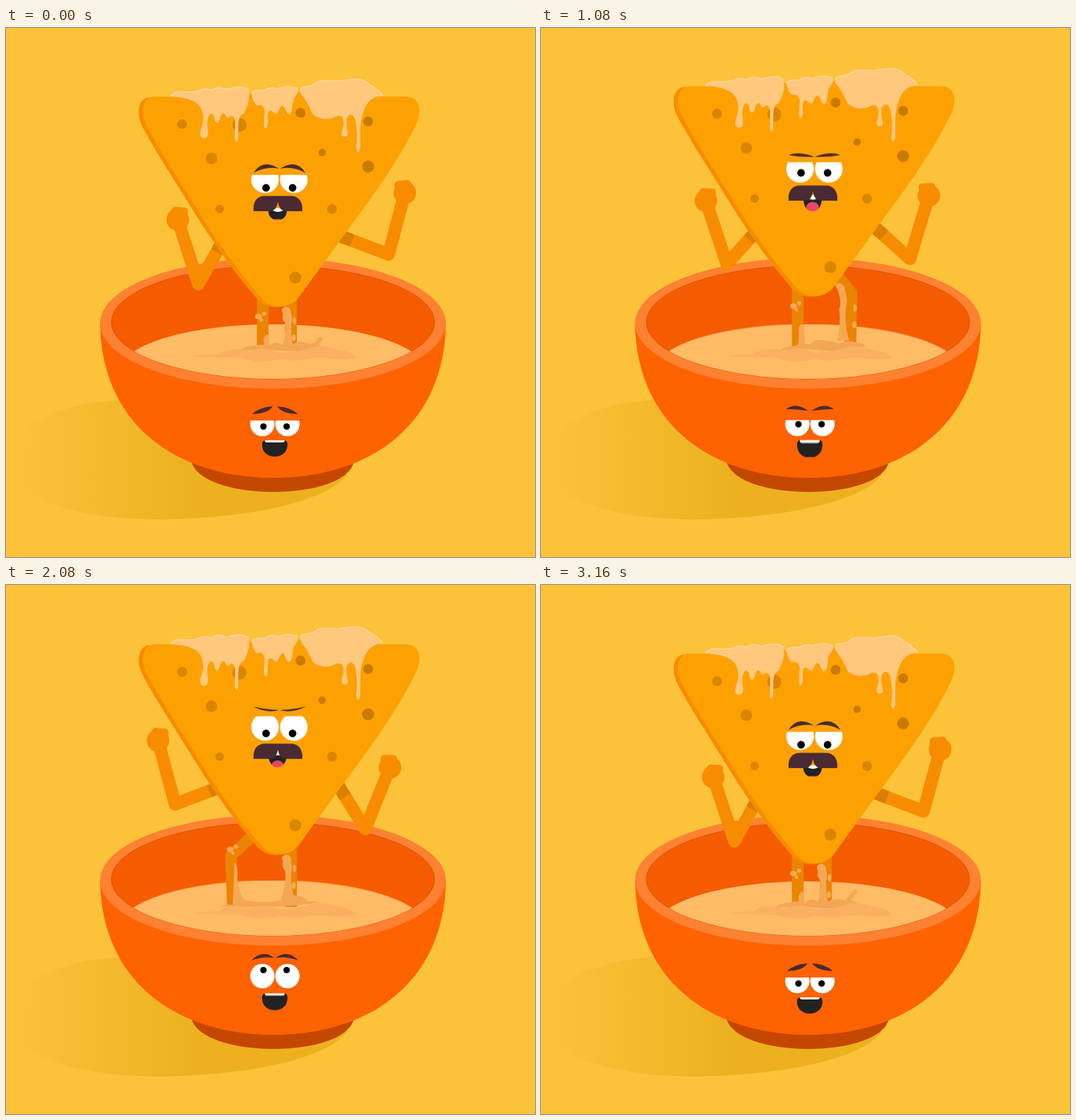
These frames come from a looping animation (748 by 748 pixels, 3200 ms). An HTML page:

```html
<!DOCTYPE html>
<html lang="en">
<head>
<meta charset="utf-8">
<title>Chip in a dip</title>
<style>
html, body { margin: 0; height: 100%; overflow: hidden; background: #fcc23a; }
svg { display: block; width: 100vw; height: 100vh; }

[class] {
  animation: 3200ms cubic-bezier(.37, 0, .63, 1) infinite;
}
.arm, .leg, .streak, .bits, .splash, .level { animation-duration: 1600ms; }
.arm, .leg { fill: none; stroke-linejoin: round; }
.arm { stroke: #f88c00; stroke-width: 18; }
.root { stroke: #da7f00; stroke-dasharray: 24 999; }
.leg { stroke: #eb8400; stroke-width: 16.5; }
.streak, .bits { fill: #f5a854; }

/* Body and liquid */
.bob { animation-name: bob; }
@keyframes bob {
  0%, 99.4%, 100% { transform: translateY(0); }
  10.3% { transform: translateY(-25px); }
  25% { transform: translateY(4px); }
  34.4% { transform: translateY(-15px); }
  46.25% { transform: translateY(2px); }
  60.3% { transform: translateY(-18px); }
  74.7% { transform: translateY(2px); }
  86.9% { transform: translateY(-21px); }
}
.level { animation-name: level; }
@keyframes level {
  0%, 52%, 100% { transform: translateY(0); }
  30% { transform: translateY(-1.5px); }
  80% { transform: translateY(-.7px); }
}
.shade { animation-name: shade; }
@keyframes shade {
  0%, 15%, 65%, 100% { transform: translateX(0); }
  26.25% { transform: translateX(3px); }
  42.5% { transform: translateX(-6px); }
  80% { transform: translateX(8px); }
}
.splash { animation-name: splash; }
@keyframes splash {
  0%, 48%, 52.5%, 100% { d: path("M330 456Q340 449 352 449Q362 446 372 450Q380 442 389 447Q397 450 405 447Q418 441 430 447Q440 444 446 450Q420 460 388 456Q360 454 330 456Z"); }
  22%, 33% { d: path("M304 454Q312 450 322 453Q334 444 345 447Q370 450 388 446Q400 436 415 440Q424 442 426 448Q438 446 443 449Q400 456 360 454Q330 457 304 454Z"); }
  72.5%, 86% { d: path("M338 457Q348 449 360 450Q370 444 382 447Q390 438 402 441Q412 441 424 446Q436 440 448 444Q458 444 461 450Q430 460 395 455Q360 452 338 457Z"); }
}
.jet { animation-name: jet; }
@keyframes jet {
  0% { transform: translateY(7px); }
  3%, 92% { transform: translateY(22px); }
  97%, 98.75% { transform: translateY(0); }
  100% { transform: translateY(7px); }
}

/* Limbs */
.arm.l { animation-name: arm-l; }
@keyframes arm-l {
  0%, 100% { d: path("M310 296L272 362L243 271"); animation-timing-function: ease-out; }
  30% { d: path("M310 296L239 323L215 233"); }
  44% { d: path("M310 296L238 325L214 235"); }
  85% { d: path("M310 296L278 363L245 274"); animation-timing-function: ease-in; }
}
.arm.r { animation-name: arm-r; }
@keyframes arm-r {
  0%, 100% { d: path("M467 292L541 320L564 233"); }
  30% { d: path("M467 292L508 358L543 271"); animation-timing-function: ease-out; }
  48% { d: path("M467 292L501 364L532 273"); }
  85% { d: path("M467 292L539 322L562 234"); }
  94% { d: path("M467 292L541 320L565 232"); }
}
.leg.l { animation-name: leg-l; }
@keyframes leg-l {
  0%, 2.5%, 48%, 100% { d: path("M363 340L363 396L363 500"); }
  22.5%, 33% { d: path("M362 356L318 396L322 500"); }
}
.leg.r { animation-name: leg-r; }
@keyframes leg-r {
  0%, 52.5%, 97.5%, 100% { d: path("M403 350L403 396L403 500"); }
  72.5%, 85% { d: path("M412 355L445 389L442 500"); }
}
.streak.l { animation-name: streak-l; }
@keyframes streak-l {
  0%, 2.5%, 48%, 100% { d: path("M364 440Q368 430 372 436Q372 446 374 470L362 470Q366 450 364 440Z"); }
  22.5%, 33% { d: path("M323 405Q329 412 327 430Q330 455 350 476L320 476Q322 440 323 405Z"); }
}
.streak.r { animation-name: streak-r; }
@keyframes streak-r {
  0%, 52.5%, 97.5%, 100% { d: path("M390 400C391 393 400 392 403 400C403 408 406 412 403 420C404 432 402 442 411 462L388 462C394 440 398 425 394 416C388 410 394 406 390 400Z"); }
  72.5%, 85% { d: path("M420 374C426 370 434 374 434 380C435 390 440 396 436 406C434 420 435 440 440 456L424 456C427 440 428 425 426 412C432 404 426 384 420 374Z"); }
}
.bits.l { animation-name: bits-l; }
@keyframes bits-l {
  0%, 2.5%, 48%, 100% { transform: translate(0, 0); }
  22.5%, 33% { transform: translate(-40px, -21px); }
}
.bits.r { animation-name: bits-r; }
@keyframes bits-r {
  0%, 52.5%, 97.5%, 100% { transform: translate(0, 0); }
  72.5%, 85% { transform: translate(42px, -4px); }
}

/* Chip face */
.lid { animation-name: lid; }
@keyframes lid {
  0%, 42.5%, 98.75%, 100% { transform: translateY(0); }
  15%, 26.25% { transform: translateY(-5.7px); }
  65% { transform: translateY(-9px); }
  80% { transform: translateY(-10px); }
}
.look { animation-name: look; }
@keyframes look {
  0%, 42.5%, 98.75%, 100% { transform: translateY(0); }
  15% { transform: translateY(-10px); }
  26.25% { transform: translateY(-11.5px); }
  65% { transform: translateY(-3px); }
  80% { transform: translateY(-4px); }
}
.brow { animation-name: brow; }
@keyframes brow {
  0%, 42.5%, 98.75%, 100% { d: path("M350 205Q363 184 386 199Q368 195 350 205Z"); }
  15% { d: path("M349 188Q366 193 386 195Q370 200 349 188Z"); }
  26.25% { d: path("M350 186Q366 192 387 195Q371 200 350 186Z"); }
  65% { d: path("M349 185Q366 189 386 190Q370 195 349 185Z"); }
  80% { d: path("M349 183Q366 188 386 190Q370 196 349 183Z"); }
}
.mouth { transform-origin: 0 255px; animation-name: mouth; }
@keyframes mouth {
  0%, 42.5%, 98.75%, 100% { transform: none; }
  15%, 26.25% { transform: translateY(-8px) scaleY(1.75); }
  65% { transform: translateY(-8px) scaleY(1.45); }
  80% { transform: translateY(-6px) scaleY(1.27); }
}
.teeth { animation-name: teeth; }
@keyframes teeth {
  0%, 36%, 48%, 100% { transform: translateY(0); }
  42.5% { transform: translateY(9px); }
}
.tongue { animation-name: tongue; }
@keyframes tongue {
  0%, 98.75%, 100% { transform: translateY(0); }
  15%, 26.25% { transform: translateY(-.5px); }
  42.5% { transform: translateY(-17px); }
  65% { transform: translateY(-5px); }
  80% { transform: translateY(-3px); }
}

/* Bowl face */
.bowl-eyes { animation-name: bowl-eyes; }
@keyframes bowl-eyes {
  0%, 42.5%, 98.75%, 100% { transform: translateY(0); }
  65% { transform: translateY(-7px); }
  80% { transform: translateY(-6px); }
}
.bowl-lid { animation-name: bowl-lid; }
@keyframes bowl-lid {
  0%, 42.5%, 98.75%, 100% { transform: translateY(0); }
  15% { transform: translateY(-6px); }
  26.25% { transform: translateY(-1px); }
  65%, 80% { transform: translateY(-25px); }
}
.bowl-look { animation-name: bowl-look; }
@keyframes bowl-look {
  0%, 15%, 98.75%, 100% { transform: translateY(0); }
  26.25%, 42.5% { transform: translateY(-3.3px); }
  65% { transform: translateY(-19px); }
  80% { transform: translateY(-16.5px); }
}
.bowl-brow { animation-name: bowl-brow; }
@keyframes bowl-brow {
  0%, 98.75%, 100% { d: path("M348 546Q358 536 377 535Q371 545 348 546Z"); }
  15% { d: path("M347 541Q358 532 378 531Q370 540 347 541Z"); }
  26.25% { d: path("M347 541Q361 530 379 539Q363 540 347 541Z"); }
  42.5% { d: path("M346 536Q360 527 376 544Q360 538 346 536Z"); }
  65% { d: path("M347 531Q362 515 379 527Q362 525 347 531Z"); }
  80% { d: path("M347 534Q361 524 378 526Q368 533 347 534Z"); }
}
.bowl-mouth { transform-origin: 0 583px; animation-name: bowl-mouth; }
@keyframes bowl-mouth {
  0%, 42.5%, 98.75%, 100% { transform: none; }
  15%, 26.25% { transform: translateY(-1px) scaleY(1.16); }
  65% { transform: translateY(-5.5px) scaleY(1.04); }
  80% { transform: translateY(-7px) scaleY(1.26); }
}
.bowl-teeth { animation-name: bowl-teeth; }
@keyframes bowl-teeth {
  0%, 65%, 98.75%, 100% { transform: translateY(0); }
  15%, 26.25% { transform: translateY(1px); }
  80% { transform: translateY(-6px); }
}
.bowl-tongue { animation-name: bowl-tongue; }
@keyframes bowl-tongue {
  0%, 42.5%, 65%, 98.75%, 100% { transform: translateY(0); }
  15%, 26.25% { transform: translateY(-1.5px); }
  80% { transform: translateY(-3.5px); }
}
</style>
</head>
<body>
<svg viewBox="0 0 748 748">
  <defs>
    <linearGradient id="fade" gradientUnits="userSpaceOnUse" x1="15" x2="265">
      <stop offset="0" stop-color="#edb120" stop-opacity="0"/>
      <stop offset="1" stop-color="#edb120"/>
    </linearGradient>
    <clipPath id="inner"><ellipse cx="377.5" cy="416" rx="228.5" ry="80"/></clipPath>
    <clipPath id="dry"><rect y="300" width="748" height="155"/></clipPath>
    <clipPath id="lips"><path d="M371 255H397V259C397 266 392 271.5 384 271.5S371 266 371 259Z"/></clipPath>
    <clipPath id="bowl-lips"><path d="M362 589Q362 583 367 583H393Q398 583 398 589C398 599 391 606 380 606S362 599 362 589Z"/></clipPath>
    <marker id="fist-l" orient="auto" markerUnits="userSpaceOnUse" markerWidth="1" markerHeight="1" overflow="visible">
      <circle r="16" fill="#f88c00"/>
      <path d="M13 0L8.500 12" stroke="#f88c00" stroke-width="11" stroke-linecap="round"/>
    </marker>
    <marker id="fist-r" orient="auto" markerUnits="userSpaceOnUse" markerWidth="1" markerHeight="1" overflow="visible">
      <circle r="16" fill="#f88c00"/>
      <path d="M13 0L8.500 -12" stroke="#f88c00" stroke-width="11" stroke-linecap="round"/>
    </marker>
    <path id="chip" d="M210 97H338Q343 96 345 91Q347 96 352 97H407Q413 94 415 87Q417 95 422 97H564C584 97 589 113 581 134C560 178 530 222 502 260C475 297 440 345 413 382C400 398 375 398 361 382C330 346 300 305 270 256C243 212 215 170 198 137C189 117 194 97 210 97Z"/>
  </defs>

  <path fill="url(#fade)" d="M165 526C90 528 0 560 0 612C0 660 90 695 218 695C340 693 450 672 482 632L400 600Z"/>

  <!-- Bowl -->
  <path fill="#c44700" d="M262 612C268 640 320 656 378 656S488 640 492 612Z"/>
  <path fill="#ff6200" d="M133 418C135 560 240 636 378 636S620 560 622 418Z"/>
  <ellipse cx="377.5" cy="417.500" rx="244.5" ry="92.5" fill="#ff8132"/>
  <ellipse cx="377.5" cy="416" rx="228.5" ry="80" fill="#f55c00" stroke="#d95200"/>
  <g clip-path="url(#inner)">
    <ellipse class="level" cx="377" cy="485" rx="216" ry="66" fill="#ffbb66"/>
  </g>

  <!-- Legs -->
  <g clip-path="url(#dry)">
    <g class="bob">
      <path class="leg l"/>
      <path class="leg r"/>
      <path class="streak l"/>
      <path class="streak r"/>
      <g class="bits l">
        <ellipse cx="357" cy="408" rx="5" ry="4"/>
        <circle cx="365" cy="404" r="3"/>
        <circle cx="361" cy="413" r="2.5"/>
      </g>
      <g class="bits r">
        <ellipse cx="408" cy="414" rx="2.500" ry="5"/>
        <ellipse cx="407" cy="438" rx="3" ry="5"/>
      </g>
    </g>
    <path class="jet" d="M434 446L444 433" stroke="#f3a655" stroke-width="6" stroke-linecap="round"/>
  </g>
  <path class="splash" fill="#f3a655"/>
  <path class="shade" fill="#f9b161" d="M262 465Q282 460 302 462Q306 454 325 454Q336 453 345 458Q358 451 374 454Q386 461 400 458Q420 457 430 452Q448 447 464 454Q492 457 496 467Q474 470 450 467Q432 466 416 470Q400 471 388 468Q364 474 346 470Q326 464 302 466Q280 464 262 465Z"/>

  <!-- Chip -->
  <g class="bob">
    <path class="arm l" marker-end="url(#fist-l)"/>
    <path class="arm l root"/>
    <path class="arm r" marker-end="url(#fist-r)"/>
    <path class="arm r root"/>
    <use href="#chip" x="-6" y="1" fill="#f88c00"/>
    <use href="#chip" fill="#fda103"/>
    <g fill="#d98500">
      <circle cx="249" cy="136" r="7"/>
      <circle cx="290.5" cy="184.500" r="8.300"/>
      <circle cx="330" cy="137" r="10"/>
      <circle cx="302" cy="256" r="6"/>
      <circle cx="461" cy="256" r="7"/>
      <circle cx="409" cy="353" r="8.500"/>
    </g>
    <g fill="#c97a00">
      <circle cx="416.500" cy="120" r="7"/>
      <circle cx="447" cy="176" r="5.300"/>
      <circle cx="512" cy="132" r="7"/>
      <circle cx="512" cy="196" r="8.500"/>
    </g>
    <g fill="#ffc87d">
      <path d="M232 97Q238 89 250 90Q266 92 276 87Q284 85 290 88Q300 81 312 87Q324 82 336 84Q343 86 344 93Q344 108 336 121Q328 124 328.500 140V157Q326 165 323.500 157L324 132Q322 122 317 125Q312 130 309 121Q304 119 302 130Q299 138 295 131Q295 121 289 121Q283 126 285 142Q288 155 280 156Q272 155 276 142Q282 128 276 114Q268 98 232 97Z"/>
      <path d="M347 93Q352 87 366 88Q376 82 384 86Q396 80 412 85Q414 92 407 100Q405 108 404 118Q399 127 395 115Q391 105 386 116Q383 126 377 118Q371 114 370 124V137Q367 147 364.500 137L366 118Q364 108 358 109Q351 112 347 93Z"/>
      <path d="M416 92Q416 82 424 83Q434 82 442 75Q456 73 468 75Q482 73 494 72Q506 72 514 80Q526 86 533 96Q516 96 508 112Q500 130 501 150V170Q498 180 495 170Q498 150 494 130Q489 117 482 127Q480 136 483 147Q485 153 479 154Q473 153 475 146Q479 136 476 127Q472 121 462 127Q446 132 434 122Q426 104 416 92Z"/>
    </g>
    <path fill="none" stroke="#ffdba8" stroke-width="1.2" d="M232 97Q238 89 250 90Q266 92 276 87Q284 85 290 88Q300 81 312 87Q324 82 336 84L343 88M347 92Q352 87 366 88Q376 82 384 86Q396 80 412 85M416 90Q416 82 424 83Q434 82 442 75Q456 73 468 75Q482 73 494 72Q506 72 514 80Q526 86 533 96"/>

    <g fill="#fff">
      <circle cx="366.300" cy="214" r="19.500"/>
      <circle cx="407" cy="214" r="19.500"/>
    </g>
    <rect class="lid" x="345" y="188" width="83" height="19.700" fill="#fda103"/>
    <g class="look">
      <circle cx="367.700" cy="226" r="5.400"/>
      <circle cx="405.200" cy="226" r="5.400"/>
    </g>
    <g fill="#4a2a33">
      <path class="brow"/>
      <path class="brow" transform="matrix(-1 0 0 1 773.5 0)"/>
    </g>
    <g class="mouth" clip-path="url(#lips)">
      <rect x="370" y="254" width="28" height="19" fill="#222"/>
      <ellipse class="tongue" cx="384" cy="275" rx="9" ry="5" fill="#e8476a"/>
      <ellipse class="teeth" cx="384.500" cy="255" rx="9" ry="5" fill="#fff"/>
    </g>
    <path fill="#4a2a33" d="M350 259V255C350 244 356 237.500 366 237.500H380Q384.500 237.500 388 237.500H403C413 237.500 419 245 419 255V259H394Q386 257 384.500 246Q383 257 375 259Z"/>
  </g>

  <!-- Bowl face -->
  <g class="bowl-eyes" fill="#fff">
    <circle cx="362.500" cy="560" r="17.200"/>
    <circle cx="398" cy="560" r="17.200"/>
  </g>
  <rect class="bowl-lid" x="343" y="541" width="75" height="14" fill="#ff6200"/>
  <g class="bowl-look">
    <circle cx="364" cy="563.500" r="4.600"/>
    <circle cx="396.800" cy="563.500" r="4.600"/>
  </g>
  <g fill="#4a2a33">
    <path class="bowl-brow"/>
    <path class="bowl-brow" transform="matrix(-1 0 0 1 760.5 0)"/>
  </g>
  <g class="bowl-mouth" clip-path="url(#bowl-lips)">
    <rect x="361" y="582" width="38" height="25" fill="#222"/>
    <ellipse class="bowl-tongue" cx="380" cy="611" rx="11" ry="5" fill="#e8476a"/>
    <rect class="bowl-teeth" x="366" y="579" width="28" height="7" rx="3" fill="#fff"/>
  </g>
</svg>
</body>
</html>
```
